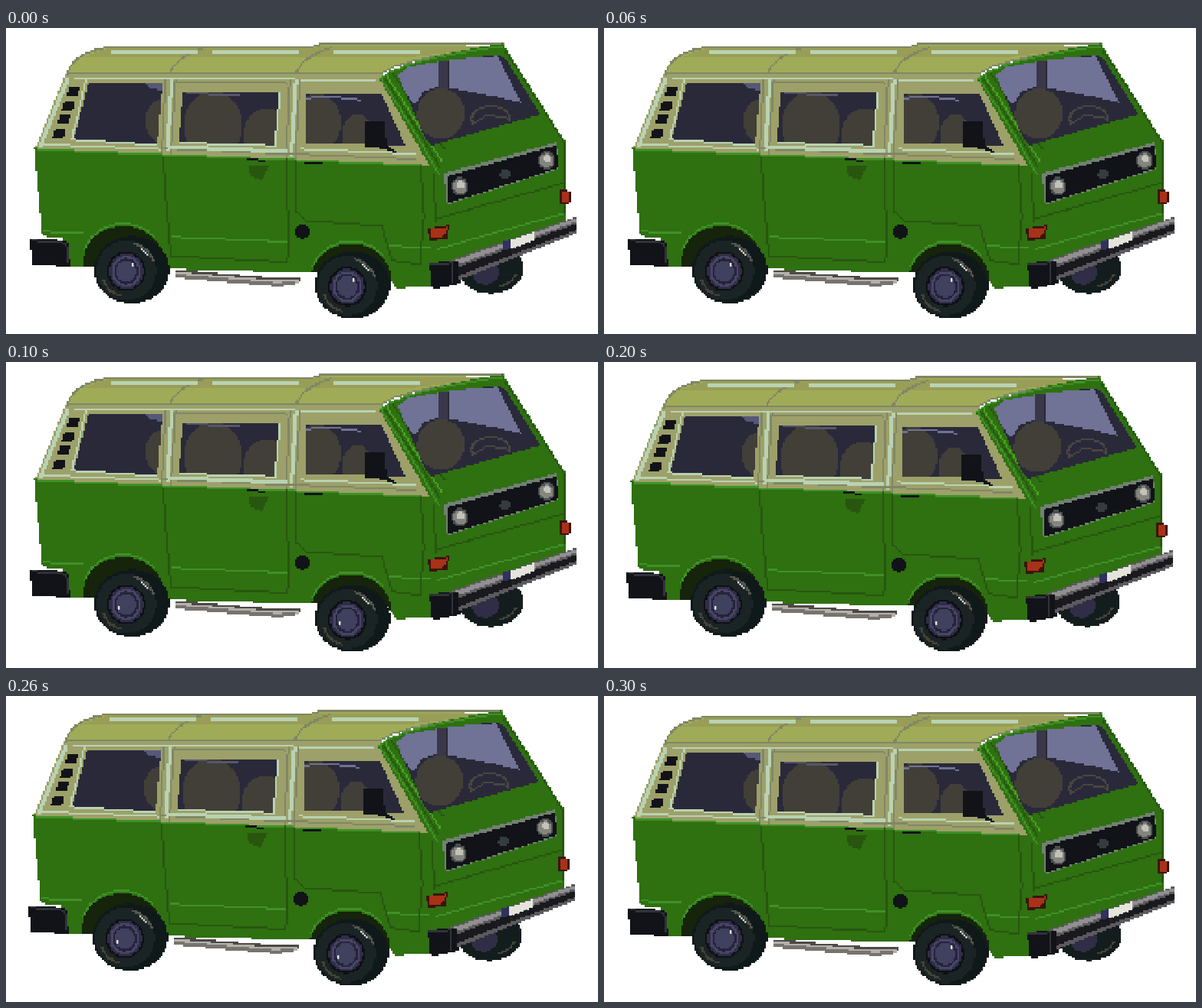
An HTML page with a canvas for the animation above (400 ms loop, 772 by 400 pixels).

```html
<!DOCTYPE html>
<html lang="en">
<head>
<meta charset="utf-8">
<title>Green van</title>
<style>
html, body { margin: 0; width: 100%; height: 100%; overflow: hidden; background: #fff; }
canvas { display: block; }
</style>
</head>
<body>
<canvas id="stage" width="772" height="400"></canvas>
<script>
const CELL = 2.4, COLS = 322, ROWS = 167;
const stage = document.getElementById('stage').getContext('2d');
stage.imageSmoothingEnabled = false;

const GREEN = '#2f7011', SEAM = '#28560f', LIGHT = '#3f9127', SHADE = '#15240b';
const CREAM = '#9da069', PALE = '#b9d2b2', TRIM = '#7f8766', ROOF = '#a0ab57';
const GLASS = '#2a293a', SKY = '#707296', SEAT = '#413f38', BLACK = '#111318';

// Everything is painted on a coarse grid, in stage coordinates.
let ctx;
function layer(paint) {
  const outer = ctx, canvas = document.createElement('canvas');
  canvas.width = COLS;
  canvas.height = ROWS;
  ctx = canvas.getContext('2d');
  paint();
  ctx = outer;
  return canvas;
}

const lerp = (a, b, t) => a + (b - a) * t;
const toPoints = shape => typeof shape === 'string'
  ? shape.split(' ').map(pair => pair.split(',').map(Number)) : shape;
const toCells = shape => toPoints(shape).map(([x, y]) => [x / CELL, y / CELL]);

function curve(from, bend, to) {
  return Array.from({ length: 17 }, (_, i) => [0, 1].map(k =>
    lerp(lerp(from[k], bend[k], i / 16), lerp(bend[k], to[k], i / 16), i / 16)));
}

function ring(cx, cy, rx, ry, from = 0, to = 360) {
  return Array.from({ length: 49 }, (_, i) => {
    const a = lerp(from, to, i / 48) * Math.PI / 180;
    return [cx + rx * Math.cos(a), cy + ry * Math.sin(a)];
  });
}

// Filling whole cells row by row keeps the edges stepped.
function fill(color, shape) {
  const points = toCells(shape), ys = points.map(p => p[1]);
  ctx.fillStyle = color;
  for (let y = Math.floor(Math.min(...ys)); y <= Math.max(...ys); y++) {
    const mid = y + 0.5, cuts = [];
    points.forEach(([x1, y1], i) => {
      const [x2, y2] = points[(i + 1) % points.length];
      if (y1 <= mid !== y2 <= mid) cuts.push(lerp(x1, x2, (mid - y1) / (y2 - y1)));
    });
    cuts.sort((a, b) => a - b);
    for (let i = 0; i + 1 < cuts.length; i += 2) {
      const left = Math.round(cuts[i]);
      ctx.fillRect(left, y, Math.round(cuts[i + 1]) - left, 1);
    }
  }
}

function line(color, shape, size = 1) {
  const points = toCells(shape);
  ctx.fillStyle = color;
  for (let i = 1; i < points.length; i++) {
    const [x1, y1] = points[i - 1], [x2, y2] = points[i];
    const steps = Math.ceil(Math.max(Math.abs(x2 - x1), Math.abs(y2 - y1))) || 1;
    for (let s = 0; s <= steps; s++) {
      ctx.fillRect(Math.floor(lerp(x1, x2, s / steps)), Math.floor(lerp(y1, y2, s / steps)), size, size);
    }
  }
}

const oval = (color, ...shape) => fill(color, ring(...shape));
const arc = (color, ...shape) => line(color, ring(...shape));

// Trim along the side follows the slope of the belt line.
const belt = x => 156 + x * 0.042;
const row = (color, drop, x1, x2, size) =>
  line(color, [[x1, belt(x1) + drop], [x2, belt(x2) + drop]], size);

// A pane hides whatever its details draw outside it.
function pane(shape, details) {
  ctx.drawImage(layer(() => {
    fill(GLASS, shape);
    ctx.globalCompositeOperation = 'source-atop';
    details();
  }), 0, 0);
}

function roof() {
  const back = curve([80, 60], [88, 30], [138, 25]);
  const brow = curve([648, 23], [510, 42], [490, 59]);
  fill(ROOF, [...back, [400, 25], [410, 22], ...brow]);
  fill('#989d58', '100,38 138,25 400,26 412,23 640,24 530,38');
  line(TRIM, [...back, [400, 24], [410, 21], [648, 21]]);
  line(TRIM, [[82, 58], ...brow.reverse()]);
  for (const x of [214, 379]) line(TRIM, curve([x, 57], [x + 12, 36], [x + 44, 26]));
  for (const x of [138, 270, 428]) line(PALE, [[x, 29], [x + 108, 29]], 2);
}

function sideWindows() {
  pane('108,71 204,73 197,152 88,146', () => {
    oval(SEAT, 202, 122, 20, 28);
    fill('#565878', '183,73 204,73 204,82 186,78');
  });
  pane('231,83 357,84 351,154 225,150', () => {
    oval(SEAT, 270, 128, 38, 46);
    oval(SEAT, 340, 142, 31, 37);
    line('#56566b', '237,86 303,87');
  });
  pane('390,86 490,87 521,154 390,150', () => {
    oval(SEAT, 405, 124, 32, 38);
    oval(SEAT, 458, 142, 20, 30);
    line(SKY, '391,92 420,89 461,94');
  });
  line(PALE, '104,69 86,146 196,153');
  line(PALE, '357,85 351,154 226,150');
  line(PALE, '90,65 480,68');
  line(TRIM, '218,71 367,72');
  for (const x of [208, 370]) {
    line(TRIM, [[x, 69], [x - 5, belt(x)]]);
    line(PALE, [[x + 7, 69], [x + 1, belt(x) - 8]], 2);
    line(TRIM, [[x + 13, 69], [x + 7, belt(x)]]);
  }
  fill(BLACK, '467,122 495,122 496,158 467,155');
  line(BLACK, '492,153 504,162', 2);
}

function side() {
  fill(CREAM, '78,59 490,57 572,184 38,158');
  fill(GREEN, '37,157 110,161 572,180 572,338 509,340 497,323 215,315 80,312 74,274 47,272');
  roof();
  line(PALE, '79,65 44,153', 2);
  for (let i = 0; i < 4; i++) {
    const x = 82 - i * 6, y = 78 + i * 18;
    fill(BLACK, [[x, y], [x + 14, y], [x + 11, y + 11], [x - 3, y + 11]]);
  }
  sideWindows();

  row(TRIM, -7, 206, 535);
  row(PALE, -6, 46, 200);
  row(PALE, -11, 213, 363, 2);
  row(PALE, -14, 384, 535);
  row(LIGHT, 1, 41, 538);
  for (const [x1, x2] of [[49, 99], [217, 367], [500, 554]]) row(LIGHT, 108, x1, x2);
  line(SEAM, '205,168 209,230 215,298 366,306 369,290 365,172');
  line(SEAM, '377,173 378,240 392,252 490,259 503,304 540,309 545,245 541,180');
  fill(SEAM, '316,180 343,180 334,199 319,194');
  for (const x of [316, 390]) row(BLACK, 3, x, x + 21);
  oval(BLACK, 386, 266, 10, 9);

  ctx.globalCompositeOperation = 'source-atop';
  for (const [x, y] of [[153, 305], [450, 328]]) {
    oval(SHADE, x, y, 52, 46);
    arc(LIGHT, x, y, 53, 49, 200, 320);
  }
  ctx.globalCompositeOperation = 'source-over';

  ['#4c4945', '#b4b0aa', '#77736f'].forEach((color, i) =>
    line(color, [[221, 317 + i * 3], [350, 328 + i * 3], [380 - i * 3, 327 + i * 3]], 2));
  fill(BLACK, '31,275 80,278 84,312 34,309');
  line('#30333a', '35,278 79,281 80,306');
}

function windshield() {
  pane('511,62 524,51 570,43 641,35 652,41 697,113 556,153 548,147', () => {
    fill(SKY, '505,63 525,45 567,40 565,76 545,83 533,101');
    fill(SKY, '578,40 641,37 672,98 645,91 578,78');
    fill('#393748', '565,40 577,40 577,81 565,79');
    oval(SEAT, 567, 112, 31, 33);
    arc('#49463f', 632, 119, 25, 17, 165, 365);
    line('#49463f', '609,126 628,113 653,118');
  });
}

// Stripe across the bumper; t runs from its top edge to its bottom edge.
function bumperStripe(color, t1, t2, x1 = 580, x2 = 745) {
  const at = (x, t) => [x, lerp(303 + 31 * t, 246 + 22 * t, (x - 580) / 165)];
  fill(color, [at(x1, t1), at(x2, t1), at(x2, t2), at(x1, t2)]);
}

function front() {
  fill(GREEN, [...curve([488, 68], [510, 42], [648, 20]), [654, 30], [730, 150],
    [730, 252], [590, 326], [558, 336], [558, 190]]);
  [LIGHT, SEAM, '#48a420', GREEN, SEAM].forEach((color, i) =>
    line(color, curve([489 + i * 4, 67 - i * 2], [524 + i * 4, 118], [564 + i * 2, 190 - i * 8])));
  line(LIGHT, curve([490, 66], [510, 43], [646, 24]));
  line(SEAM, '651,29 728,150 728,240');
  windshield();

  for (const [color, y] of [[SEAM, 249], [LIGHT, 289]]) line(color, [[562, y], [726, y - 46]]);
  line(SEAM, '558,190 560,253');
  fill('#728073', '571,190 718,149 721,184 575,231');
  fill(BLACK, '575,194 718,153 720,183 577,229');
  for (const [x, y] of [[592, 207], [705, 173]]) {
    oval('#4c4f50', x, y, 11, 12);
    oval('#85857f', x, y, 9, 9);
    oval('#c4c2b8', x + 1, y - 2, 5, 5);
  }
  oval('#343c40', 651, 191, 7, 7);

  fill('#3a140c', '550,262 578,257 576,276 552,278');
  fill('#a83218', '554,263 576,260 571,272 555,274');
  fill('#3a140c', '722,211 736,213 736,229 723,230');
  fill('#a83218', '725,213 735,215 735,227 725,227');

  bumperStripe('#5c5a5d', 0, 1);
  bumperStripe('#918f90', 0.08, 0.3);
  bumperStripe('#19191e', 0.42, 0.8);
  bumperStripe('#30315e', 0, 0.45, 649, 657);
  bumperStripe('#e4e4dc', 0.05, 0.5, 657, 688);
  fill(BLACK, '552,307 589,304 592,334 556,342');
  line('#30333a', '554,309 581,307 583,333');
}

function wheel(cx, cy) {
  oval('#10191a', cx, cy, 49, 44);
  oval('#1b2424', cx - 7, cy + 1, 39, 39);
  arc('#444239', cx - 6, cy + 2, 33, 33, 105, 160);
  arc('#55564f', cx - 6, cy + 1, 37, 36, 285, 340);
  ['#0e1015', '#302e46', '#48456a', '#252337', '#40405f'].forEach((color, i) =>
    oval(color, cx - 7, cy + 2, 25 - i * 3, 26 - i * 3));
}

const WHEELS = [[164, 316], [452, 336]];
const farWheel = layer(() => {
  oval('#141d1d', 632, 314, 43, 33);
  oval('#302e46', 625, 319, 18, 16);
  arc('#444239', 632, 314, 35, 25, 20, 70);
});
const body = layer(() => {
  side();
  front();
});
const nearWheels = layer(() => WHEELS.forEach(([x, y]) => wheel(x, y)));

const BOUNCE = [0, -4, -1, 2];

function draw(now) {
  const step = Math.floor(now / 100) % 4;
  const sway = step === 2 ? -2 : 0;
  const wheelDrop = step ? -1 : 0;
  const put = (image, y) => stage.drawImage(image, sway, y, COLS * CELL, ROWS * CELL);
  stage.fillStyle = '#fff';
  stage.fillRect(0, 0, 772, 400);
  put(farWheel, wheelDrop);
  put(body, BOUNCE[step]);
  put(nearWheels, wheelDrop);

  stage.fillStyle = '#e6e7e5';
  for (const [x, y] of WHEELS) {
    const left = x + sway, top = y + wheelDrop;
    const hubX = step % 3 ? -18 : 0, hubY = step % 3 ? 4 : -9;
    stage.fillRect(left + hubX, top + hubY, CELL, CELL * 2);
    for (let i = 0; i < 4; i++) {
      stage.fillRect(left + 12 + i * CELL, top - 28 + i * CELL, CELL, CELL);
    }
  }

  stage.save();
  stage.translate(659 + sway, 296 + BOUNCE[step]);
  stage.rotate(-0.35);
  stage.font = 'bold 11px "Liberation Mono", monospace';
  stage.fillStyle = '#24242a';
  stage.fillText('K207', 1, 0);
  stage.restore();
}

function tick() {
  draw(performance.now());
  requestAnimationFrame(tick);
}
tick();
</script>
</body>
</html>
```
